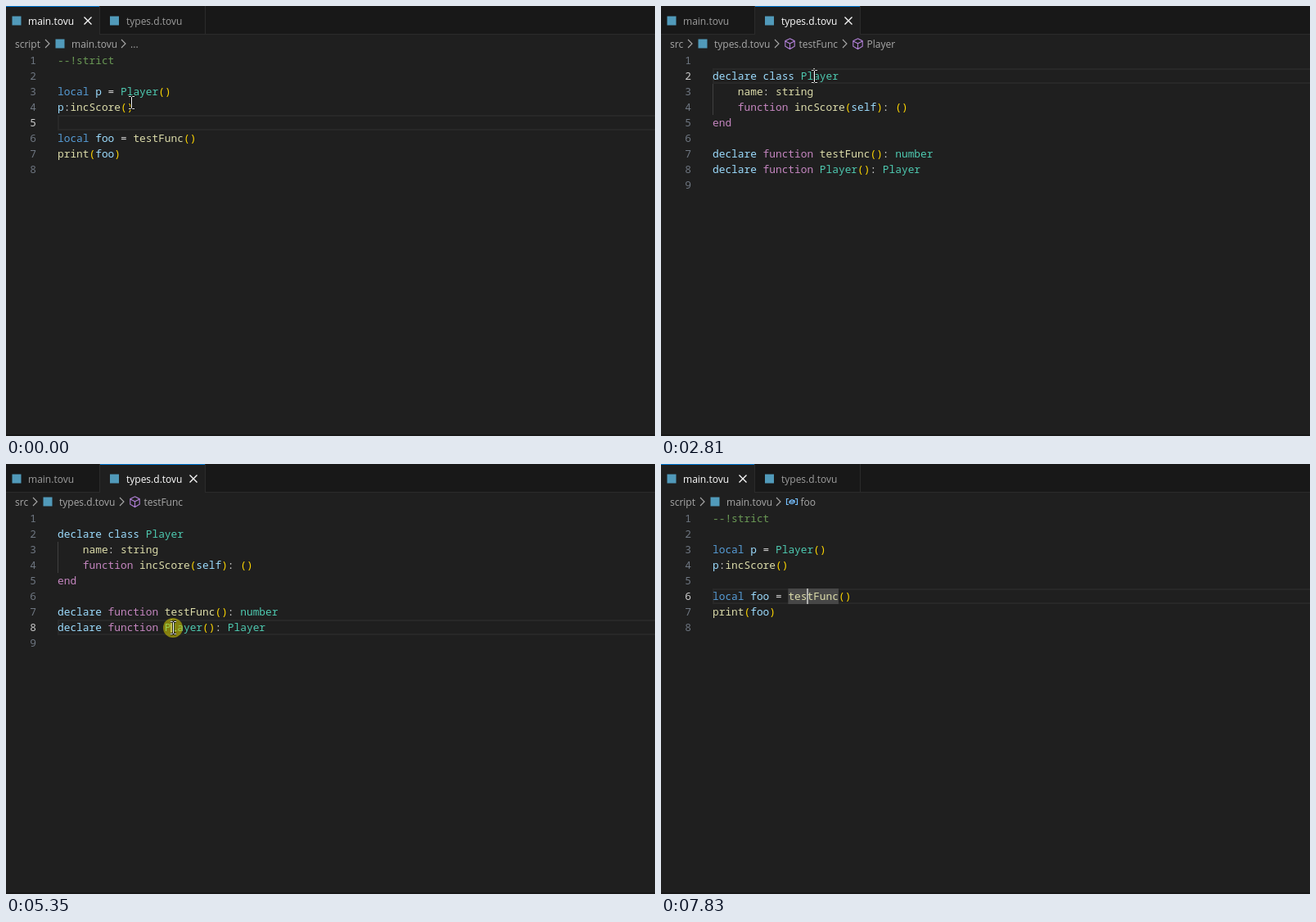
Recreate the animation shown at these times as an HTML page. Size 793x525 px, loop 8000 ms.

```html
<!DOCTYPE html>
<html lang="en">
<head>
<meta charset="utf-8">
<title>Editor</title>
<style>
  html, body { margin: 0; width: 100%; height: 100%; overflow: hidden; background: #1f1f1f; }
  svg { display: block; }
  text { white-space: pre; }
  .code { font: 12.83px "Noto Sans Mono", monospace; }
  .ui { font: 12px "Open Sans", sans-serif; }
</style>
</head>
<body>
<svg id="stage" width="793" height="525" viewBox="0 0 793 525"></svg>
<script>
const LOOP = 8000, LEFT = 63, TOP = 57, ROW = 19, CHAR = 7.698;
const stage = document.getElementById('stage');

const colors = {
  c: '#6a9955', k: '#569cd6', v: '#9cdcfe', w: '#d4d4d4', t: '#4ec9b0',
  y: '#ffd700', f: '#dcdcaa', m: '#c586c0'
};

// {x} switches to the colour with that key.
const files = [
  {
    name: 'main.tovu', folder: 'script', tab: [0, 114], closeX: 100,
    crumbX: { first: 51, icon: 60, name: 80, second: 144, tail: 153 },
    lines: ['{c}--!strict', '', '{k}local {v}p {w}= {t}Player{y}()', '{v}p{w}:{f}incScore{y}()', '',
      '{k}local {v}foo {w}= {f}testFunc{y}()', '{f}print{y}({v}foo{y})', '']
  },
  {
    name: 'types.d.tovu', folder: 'src', tab: [115, 128], closeX: 229,
    crumbX: { first: 36, icon: 45, name: 65, second: 142, tail: 151 },
    lines: ['', '{v}declare class {t}Player', '    {f}name{w}: {f}string',
      '    {m}function {f}incScore{y}({v}self{y}){w}: {y}()', '{m}end', '',
      '{v}declare {m}function {f}testFunc{y}(){w}: {t}number',
      '{v}declare {m}function {t}Player{y}(){w}: {t}Player', '']
  }
];

// Each entry overrides the ones before it. marks: [line, column, length]
const players = [[2, 14, 6], [8, 17, 6], [8, 27, 6]];
const changes = [
  [0, { file: 0, line: 5, caret: null, crumbs: [], marks: [], blink: true }],
  [1560, { file: 1, line: 9, caret: 0, since: 1560, crumbs: ['testFunc', 'Player'] }],
  [2700, { line: 2, caret: 16, since: 2700 }],
  [2900, { crumbs: [] }],
  [2950, { marks: players }],
  [3480, { line: 3, caret: 8, since: 3480, marks: [] }],
  [3730, { marks: [[3, 4, 4]] }],
  [4540, { line: 7, caret: 18, since: 4540, marks: [] }],
  [4610, { crumbs: ['testFunc'] }],
  [4830, { marks: [[7, 17, 8]] }],
  [5320, { line: 8, caret: 18, since: 5320, marks: [] }],
  [5570, { marks: players, crumbs: ['testFunc', 'Player'] }],
  [6000, { file: 0, line: 5, caret: 0, since: 6000, marks: [], crumbs: [] }],
  [6800, { line: 6, caret: 15, blink: false }],
  [7060, { crumbs: ['foo'] }],
  [7230, { marks: [[6, 12, 8]] }]
];

const presses = [1490, 2660, 3460, 4500, 5290, 5950, 6780];
const PRESS_LENGTH = 90;

// Pointer stops: [time, x, y]
const path = [
  [0, 153, 118], [40, 153, 118], [180, 165, 107], [600, 165, 107], [860, 175.5, 18],
  [1800, 175.5, 18], [1890, 185, 68], [2050, 185, 68], [2150, 185, 77], [2500, 185, 77],
  [2640, 187, 86], [3390, 187, 86], [3470, 128, 110], [3700, 128, 110], [4060, 204, 182],
  [5040, 204, 182], [5270, 204, 200], [5600, 204, 200], [5830, 60, 18], [6080, 60, 18],
  [6500, 181, 159], [7460, 181, 159], [7630, 755, 380], [7700, 830, 440]
];

const rect = (x, y, w, h, fill) => `<rect x="${x}" y="${y}" width="${w}" height="${h}" fill="${fill}"/>`;
const line = (d, stroke, width = 1.1) => `<path d="${d}" fill="none" stroke="${stroke}" stroke-width="${width}"/>`;
const label = (x, y, text, fill, kind = 'ui') => `<text class="${kind}" x="${x}" y="${y}" fill="${fill}">${text}</text>`;
const chevron = x => line(`M${x - 3} 41l5 5l-5 5`, '#a9a9a9');
const close = (x, color) => line(`M${x - 4.5} 13.5l9 9m0-9l-9 9`, color, 1.3);
const fileIcon = (x, y) => rect(x, y, 11, 11, '#519aba');
const cube = x => line(`M${x + 6.5} 39.8l5.7 2.9v6.6l-5.7 3.2l-5.7-3.2v-6.6zM${x + 1} 43l5.5 2.8l5.5-2.8m-5.5 2.8v6.5`, '#b180d7');
const variable = x => line(`M${x + 3} 42.5h-2.5v7h2.5m8-7h2.5v7h-2.5M${x + 4} 45.5l3-1.8l3.2 1.2v2l-3.2 1.8l-3-1.2zl3 1.2l3.2-2`, '#75beff', 1.2);
const rowY = n => TOP + (n - 1) * ROW;
const columnX = n => LEFT + n * CHAR;

function stateAt(time) {
  return Object.assign({}, ...changes.filter(([start]) => start <= time).map(([, values]) => values));
}

function pointerAt(time) {
  const next = path.findIndex(([t]) => t > time);
  if (next < 0) return path[path.length - 1].slice(1);
  const [t0, x0, y0] = path[next - 1], [t1, x1, y1] = path[next];
  const u = (time - t0) / (t1 - t0), ease = u * u * (3 - 2 * u);
  return [x0 + (x1 - x0) * ease, y0 + (y1 - y0) * ease];
}

function tabs(state, [px, py]) {
  let out = rect(0, 0, 793, 35, '#181818') + rect(0, 34, 793, 1, '#2b2b2b');
  files.forEach((file, i) => {
    const [x, width] = file.tab, active = i === state.file;
    const hover = py < 35 && px >= x && px < x + width;
    if (active || hover) out += rect(x, 0, width, active ? 35 : 34, '#1f1f1f');
    if (active) out += rect(x, 0, width, 1, '#0078d4');
    out += rect(x + width, 0, 1, 35, '#2b2b2b') + fileIcon(x + (i ? 12 : 7.5), 12.5);
    out += label(x + (i ? 32 : 27), 23, file.name, active ? '#fff' : '#9d9d9d');
    if (active || hover) out += close(file.closeX, active ? '#fff' : '#9d9d9d');
  });
  return out;
}

function breadcrumbs({ file, crumbs }) {
  const { folder, name, crumbX: at } = files[file], gray = '#a9a9a9';
  let out = label(11, 51, folder, gray) + chevron(at.first) + fileIcon(at.icon + .5, 40.5);
  out += label(at.name, 51, name, gray) + chevron(at.second);
  if (!crumbs.length) return out + label(at.tail - 1, 51, '...', gray);
  crumbs.forEach((crumb, i) => {
    const x = at.tail + i * 83;
    if (i) out += chevron(x - 9);
    out += (file ? cube(x) : variable(x)) + label(x + 17.5, 51, crumb, gray);
  });
  return out;
}

function codeLine(source, y) {
  const spans = source.replace(/\{(\w)\}([^{]*)/g, (_, key, text) => `<tspan fill="${colors[key]}">${text}</tspan>`);
  return label(LEFT, y, spans, '#d4d4d4', 'code');
}

function editor(state, time) {
  const y = rowY(state.line);
  let out = rect(LEFT, y, 730, ROW, '#282828') + rect(LEFT + 2, y + 2, 728, ROW - 4, '#1f1f1f');
  for (const [row, column, length] of state.marks)
    out += rect(columnX(column), rowY(row), length * CHAR, ROW, '#474747');
  if (state.file) out += rect(LEFT, rowY(3), 1, ROW * 2, [3, 4].includes(state.line) ? '#707070' : '#404040');
  files[state.file].lines.forEach((source, i) => {
    const baseline = rowY(i + 1) + 14;
    out += label(29.3, baseline, i + 1, i + 1 === state.line ? '#ccc' : '#6e7681', 'code') + codeLine(source, baseline);
  });
  const lit = !state.blink || (time - state.since) % 1000 < 500;
  if (state.caret !== null && lit)
    out += rect(Math.round(columnX(state.caret) - .5), y, 2, ROW, '#aeafad');
  return out;
}

function pointer([x, y], time) {
  const hand = y < 57;
  let out = '';
  if (presses.some(start => time >= start && time < start + PRESS_LENGTH))
    out += `<circle cx="${x}" cy="${y}" r="12" fill="#d8d000" opacity=".55"/>`;
  const beam = 'M-3.5-7.5h2.5l1 1l1-1h2.5M0-6.5v13M-3.5 7.5h2.5l1-1l1 1h2.5';
  const shape = hand
    ? '<path d="M-2 1Q0-1 2 1V9l5 1.2q3 .8 3 3.5l-1 5q-.5 2-2.5 3v1h-8v-1l-5-6q-1.5-2.5.5-3.2q2-.3 4 1z" fill="#fff" stroke="#111" stroke-width=".9"/>'
    : line(beam, '#000', 2.4) + line(beam, '#fff', 1);
  const [sx, sy] = hand ? [x, y] : [Math.round(x) + .5, Math.round(y)];
  return out + `<g transform="translate(${sx} ${sy})">${shape}</g>`;
}

function draw() {
  const time = performance.now() % LOOP;
  const state = stateAt(time), position = pointerAt(time);
  stage.innerHTML = rect(0, 0, 793, 525, '#1f1f1f') + tabs(state, position) + breadcrumbs(state) +
    editor(state, time) + rect(0, 523, 793, 2, '#181818') + pointer(position, time);
  requestAnimationFrame(draw);
}
draw();
</script>
</body>
</html>
```
